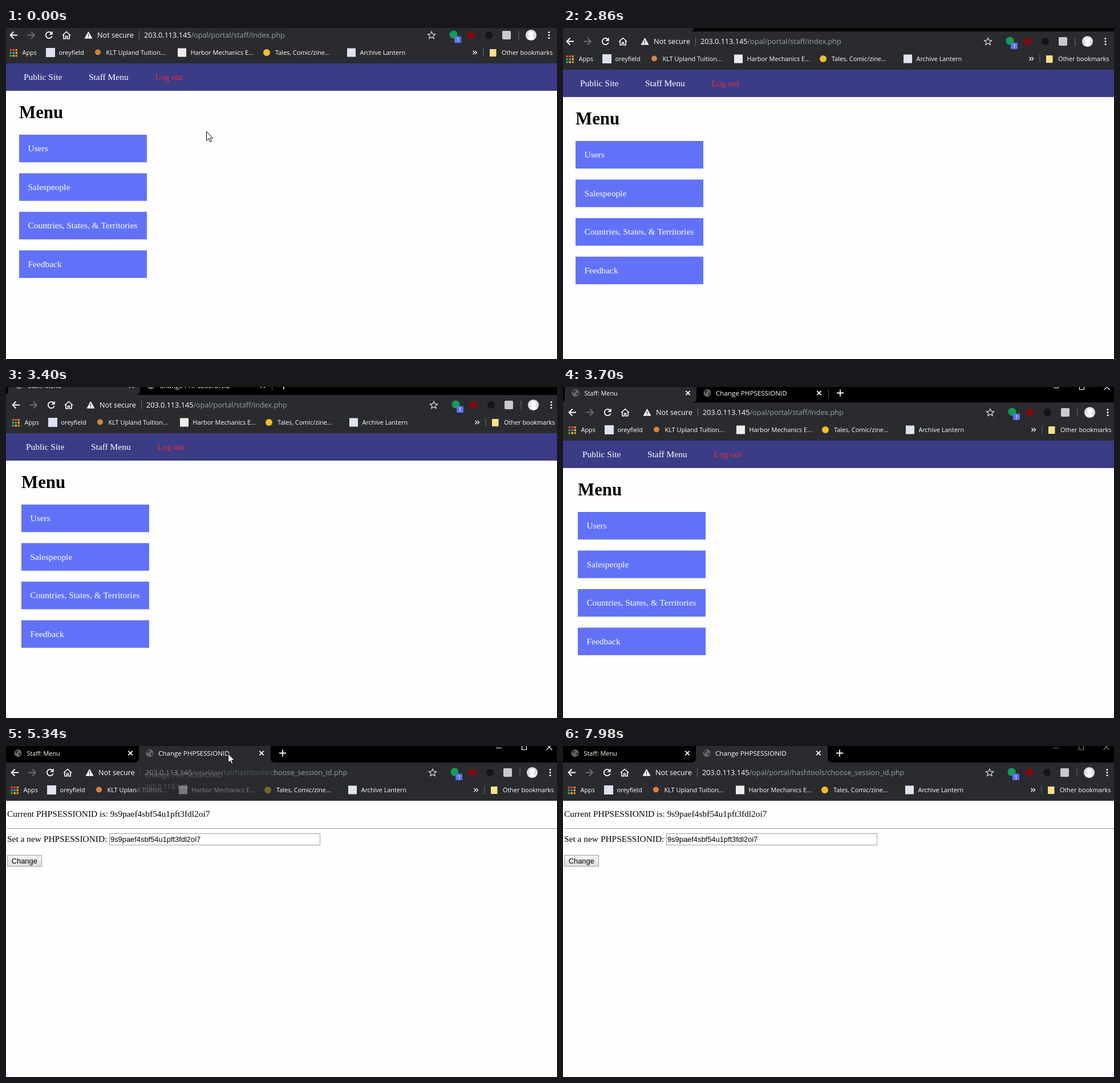
These frames come from a looping animation (966x580 px, 8000 ms). An HTML page:

```html
<!DOCTYPE html>
<html lang="en">
<head>
<meta charset="utf-8">
<title>Session demo</title>
<style>
html, body { margin: 0; width: 100%; height: 100%; overflow: hidden; background: #fefefe; }
svg { display: block; }
text { white-space: pre; }
.ui { font-family: "Open Sans", "Noto Sans", sans-serif; fill: #fff; }
.page { font-family: "Liberation Serif", "Times New Roman", serif; font-size: 15.45px; }
.form { font-family: "Liberation Sans", Arial, sans-serif; font-size: 12.88px; }
.line { fill: none; stroke: #fff; stroke-width: 1.8; }
</style>
</head>
<body>
<svg id="stage" width="966" height="580" viewBox="0 0 966 580"></svg>
<script>
const LOOP = 8000;
const BAR = '#292b2e';
const HOST = '203.0.113.145';
const SESSION = '9s9paef4sbf54u1pft3fdl2oi7';

const text = (x, y, str, size, extra = '') =>
  `<text x="${x}" y="${y}" ${size ? `font-size="${size}"` : ''} ${extra}>${str}</text>`;
const rect = (x, y, w, h, fill, extra = '') =>
  `<rect x="${x}" y="${y}" width="${w}" height="${h}" fill="${fill}" ${extra}/>`;
const circle = (x, y, r, fill) => `<circle cx="${x}" cy="${y}" r="${r}" fill="${fill}"/>`;
const line = (d, extra = '') => `<path class="line" d="${d}" ${extra}/>`;
const group = (id, body, extra = '') => `<g id="${id}" ${extra}>${body}</g>`;
const cross = (x, y, r) => line(`M${x - r} ${y - r}l${2 * r} ${2 * r}m0 ${-2 * r}l${-2 * r} ${2 * r}`);

const tabShape = (id, x, w) =>
  `<path id="${id}" d="M${x - 8} 29q8 0 8-8V3q0-8 8-8h${w - 16}q8 0 8 8v18q0 8 8 8z"/>`;
const globe = x => circle(x, 12.5, 6.5, '#686b70') +
  `<path d="M${x - 5} 9l4-2 2 3-3 2-1 3zm6 4l4-2v4l-3 2z" fill="#303236"/>`;

function tabs() {
  return rect(-10, -40, 990, 70, '#000') +
    tabShape('tab1', 2, 231) + tabShape('tab2', 233, 231) +
    globe(21) + text(36.5, 17, 'Staff: Menu', 10.9) + cross(218, 12.5, 3.7) +
    globe(252) + text(267, 17, 'Change PHPSESSIONID', 11.6) + cross(448, 12.5, 3.7) +
    line('M464.5 6v15', 'id="divider" style="stroke:#505256;stroke-width:1"') +
    line('M479 12.5h12m-6-6v12') +
    group('controls', '<path d="M859 3.5h10M904.5-2.5h8v9h-8zM947.5-3l10 10m0-10l-10 10"/>',
      'fill="none" stroke-width="1.2"');
}

function toolbar() {
  const back = 'M22 46.5H9.5m6-6l-6 6 6 6';
  const star = 'M748 40.3l1.9 4.2 4.6.4-3.5 3 1.1 4.5-4.1-2.4-4.1 2.4 1.1-4.5-3.5-3 4.6-.4z';
  return line(back) +
    line('M39.5 46.5H52m-6-6l6 6-6 6', 'style="stroke:#6d6f73"') +
    line('M81.5 42.6a5.6 5.6 0 1 0 1.2 5.6') + '<path d="M83.7 39.5v6.3h-6.3z"/>' +
    line('M101 47l7-6.5 7 6.5m-12-1.5v7.3h3.6v-4.6h2.8v4.6h3.6v-7.3', 'style="stroke-width:1.6"') +
    '<path d="M146.5 40l7 12.5h-14z"/>' +
    rect(145.8, 44.5, 1.4, 4, BAR) + rect(145.8, 49.5, 1.4, 1.5, BAR) +
    text(162, 51, 'Not secure', 12.65) +
    rect(235, 39, 1, 15, '#6a6c70') +
    `<text x="244" y="51" font-size="12.65">${HOST}<tspan id="path" fill="#9aa0a6"></tspan></text>` +
    line(star, 'style="stroke:#d5d7da;stroke-width:1.3"') +
    circle(786.5, 45.5, 7, '#159a5b') + rect(788, 48.5, 12, 11.5, '#5a72f0', 'rx="2"') +
    text(791.4, 58, '1', 9.5) +
    circle(817.5, 46.5, 7, '#7d0b12') + circle(848.5, 46.5, 6.5, '#131415') +
    rect(872, 39, 15, 15, '#c9cacb', 'rx="2"') +
    rect(900.5, 39, 1, 15, '#6a6c70') +
    circle(922.5, 46.5, 9.6, '#dcdde0') + circle(922.5, 44.5, 4.5, '#fff') +
    '<ellipse cx="922.5" cy="52" rx="5.5" ry="3.2"/>' +
    [41.5, 46.5, 51.5].map(y => circle(954, y, 1.5, '#fff')).join('');
}

function bookmarks() {
  const dots = ['#e8453c', '#e8453c', '#f08a24', '#35a853', '#4a86e8', '#f4b91c', '#35a853', '#f4b91c', '#f08a24'];
  const labels = [
    [30.5, 'Apps'], [94.5, 'oreyfield'], [177.5, 'KLT Upland Tuition...'],
    [325.5, 'Harbor Mechanics E...'], [474, 'Tales, Comic/zine...'],
    [622.5, 'Archive Lantern'], [871, 'Other bookmarks']
  ];
  return dots.map((c, i) => rect(8.5 + i % 3 * 5, 71 + Math.floor(i / 3) * 5, 3.4, 3.4, c)).join('') +
    rect(72, 69, 16, 16, '#dde1f3') + circle(163, 76.5, 5, '#d98238') +
    rect(303, 69.5, 15, 15, '#eeeeee') + circle(459, 77, 6, '#f2bd2c') +
    rect(600, 69.5, 15, 15, '#dfe3ee') +
    labels.map(([x, s]) => text(x, 81, s, 10.9)).join('') +
    line('M820.5 74l3 3-3 3m4-6l3 3-3 3', 'style="stroke-width:1.3"') +
    rect(838.5, 69, 1, 15, '#6a6c70') +
    '<path d="M850 71h8l3.5 0v13H850z" fill="#fbe08a"/>';
}

function menuPage() {
  const items = ['Users', 'Salespeople', 'Countries, States, &amp; Territories', 'Feedback'];
  return rect(-10, 96, 990, 48, '#3b3c86') +
    text(33, 125.3, 'Public Site', 0, 'fill="#fff"') +
    text(147, 125.3, 'Staff Menu', 0, 'fill="#fff"') +
    text(263.5, 125.3, 'Log out', 0, 'fill="#f52b35"') +
    text(25, 192, 'Menu', 30.9, 'font-weight="bold"') +
    items.map((s, i) => {
      const y = 221 + 67.55 * i;
      return rect(25, y, 224, 48.3, '#6172f8') + text(40.5, y + 29, s, 0, 'fill="#fff"');
    }).join('');
}

function sessionPage() {
  return text(2, 124.3, 'Current PHPSESSIONID is: ' + SESSION) +
    rect(2, 144, 964, 1, '#929292') +
    text(2, 168, 'Set a new PHPSESSIONID:') +
    rect(181.5, 153.5, 369, 20, '#fff', 'stroke="#9c9c9c"') +
    text(183, 167.7, SESSION, 0, 'class="form"') +
    rect(2.5, 191.5, 60, 19.5, 'url(#button)', 'stroke="#9c9c9c"') +
    text(9.7, 205.7, 'Change', 0, 'class="form"');
}

document.getElementById('stage').innerHTML =
  `<defs><linearGradient id="button" x2="0" y2="1">
    <stop stop-color="#f6f6f6"/><stop offset="1" stop-color="#dcdcdc"/></linearGradient></defs>` +
  rect(0, 0, 966, 580, '#fefefe') +
  group('win',
    group('chrome', tabs() + rect(-10, 29, 990, 67, BAR) + toolbar() + bookmarks(), 'class="ui"') +
    group('menu', menuPage(), 'class="page"') +
    group('session', sessionPage(), 'class="page"')) +
  group('tip',
    rect(228, 39, 240, 54, BAR, 'id="tipBox" rx="3"') +
    group('tipText', text(243, 54.5, 'Change PHPSESSIONID', 12.8) + text(243, 74.5, HOST, 11.65)),
    'class="ui"') +
  group('arrow', '<path d="M.5.5v15.8l3.6-3.4 2.5 5.6 2.5-1.1-2.4-5.5h4.8z" fill="#fff" stroke="#000"/>') +
  group('beam', '<path d="M0 .5h2.5l1 1 1-1H7M3.5 1v14M0 15.5h2.5l1-1 1 1H7" fill="none" stroke="#111"/>');

const el = id => document.getElementById(id);

// Each track lists [start time, ...values]; values hold until the next entry.
const windowTrack = [
  [0, -2, -34], [2860, -3, -23], [3010, -1, -20], [3130, 0, -17], [3280, 1, -16],
  [3400, 2, -15], [3550, 2, -8], [3700, 1, -2], [3820, 0, 0]
];
const cursorTrack = [
  [0, 'arrow', 351, 181], [120, 'arrow', 336, 92], [240, 'arrow', 320, 31],
  [390, 'arrow', 316, 4], [510, 'arrow', 312, -11], [660, 'arrow', 312, -15], [910],
  [1220, 'arrow', 407, -9], [1370, 'arrow', 442, -12], [1490],
  [3970, 'arrow', 455, 8], [4090, 'arrow', 452, 23], [4240, 'arrow', 420, 4],
  [4360, 'arrow', 391, 18], [5190, 'arrow', 389, 13], [5640, 'arrow', 345, 96],
  [5760, 'arrow', 298, 190], [5910, 'arrow', 284, 211], [6030, 'beam', 325, 153],
  [6180, 'arrow', 361, 119], [6590, 'beam', 351, 111], [6740, 'beam', 339, 111], [7020]
];
const tipTrack = [[0, 0, 0], [4640, .6, .4], [4760, 1, 1], [5340, .6, .24], [5490, 0, 0]];

const at = (track, t) => track.findLast(step => step[0] <= t).slice(1);
const show = (id, on) => el(id).setAttribute('visibility', on ? 'visible' : 'hidden');
const move = (id, x, y) => el(id).setAttribute('transform', `translate(${x} ${y})`);
const fill = (id, color) => el(id).setAttribute('fill', color);

function draw() {
  const t = performance.now() % LOOP;
  const switched = t >= 5340;
  const hover = t >= 3970;

  move('win', ...at(windowTrack, t));
  show('menu', !switched);
  show('session', switched);
  show('divider', !hover);
  fill('tab1', switched ? '#000' : BAR);
  fill('tab2', switched ? BAR : hover ? '#131415' : '#000');
  el('path').textContent = '/opal/portal/' +
    (switched ? 'hashtools/choose_session_id.php' : 'staff/index.php');
  el('controls').setAttribute('stroke', t >= 7980 ? '#77797c' : '#fff');

  const [box, label] = at(tipTrack, t);
  el('tipBox').setAttribute('opacity', box);
  el('tipText').setAttribute('opacity', label);

  const [kind, x, y] = at(cursorTrack, t);
  for (const id of ['arrow', 'beam']) {
    show(id, id === kind);
    if (id === kind) move(id, x, y);
  }
  requestAnimationFrame(draw);
}
draw();
</script>
</body>
</html>
```
